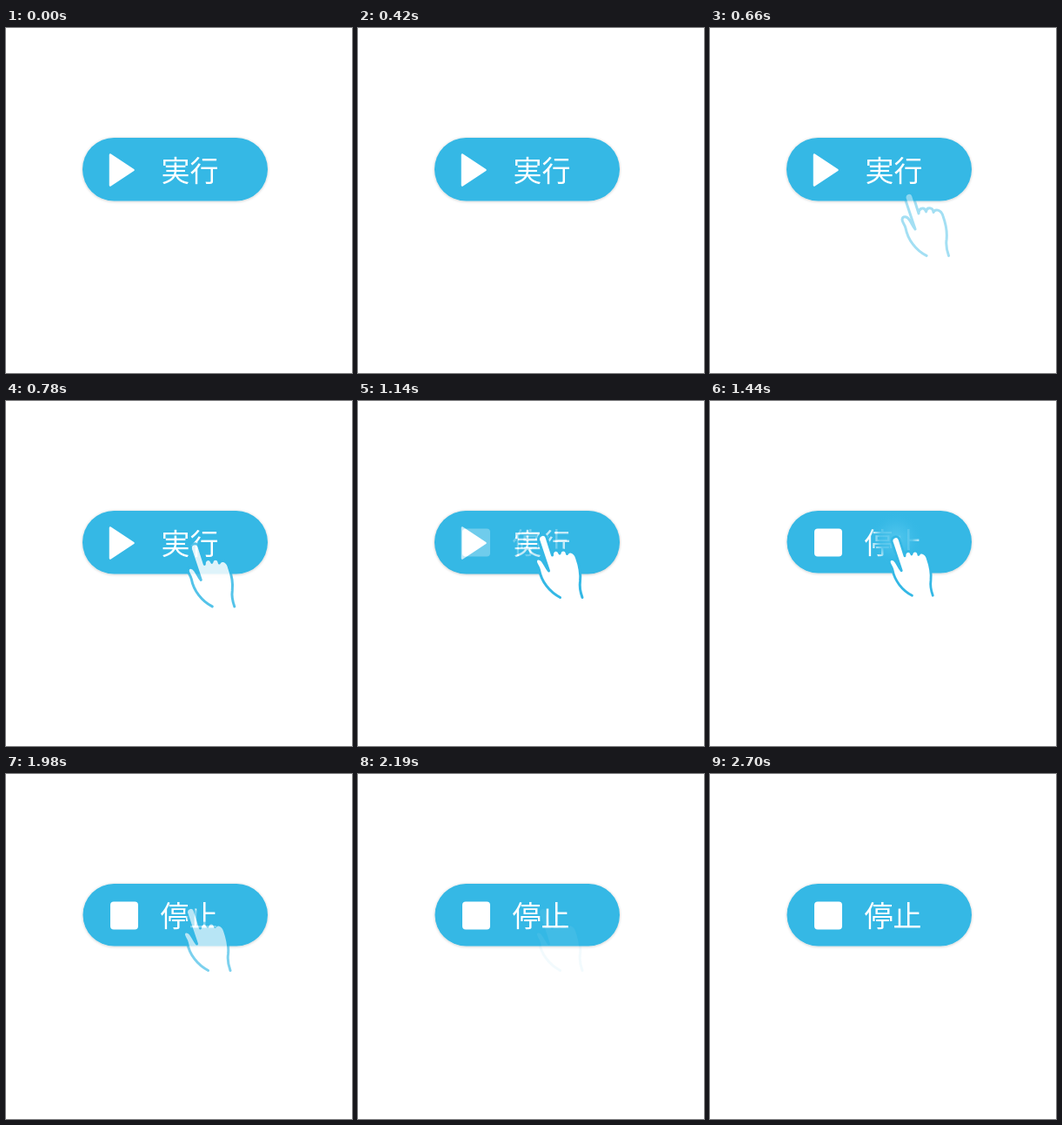
An HTML page that plays this animation: 398x396 px, repeating every 5430 ms.

```html
<!DOCTYPE html>
<html lang="ja">
<head>
<meta charset="utf-8">
<style>
html, body { margin: 0; height: 100%; overflow: hidden; background: #fff; }
svg { display: block; }
text { font: 300 33px "Noto Sans CJK JP", "Noto Sans CJK", "Noto Sans", sans-serif; }
.bar { fill: #34b8e5; }
.white { fill: #fff; }
</style>
</head>
<body>
<svg width="398" height="396" viewBox="0 0 398 396">
  <defs>
    <filter id="shadow" x="-10%" y="-20%" width="120%" height="140%">
      <feDropShadow dx="0" dy="0.5" stdDeviation="1.8" flood-color="#000" flood-opacity=".24"/>
    </filter>
    <radialGradient id="glow">
      <stop offset="0" stop-color="#55c8ee"/>
      <stop offset=".6" stop-color="#3dbce8"/>
      <stop offset="1" stop-color="#34b8e5" stop-opacity="0"/>
    </radialGradient>
  </defs>

  <g id="run">
    <rect class="bar" x="88" y="126" width="213" height="72.5" rx="36.2" filter="url(#shadow)"/>
    <path class="white" d="M120 145.500L146.500 163L120 180.500Z" stroke="#fff" stroke-width="2.500" stroke-linejoin="round"/>
    <text class="white" x="178.500" y="175.500">実行</text>
  </g>

  <g id="stop">
    <rect class="bar" x="88.500" y="126" width="212.500" height="71.500" rx="35.700" filter="url(#shadow)"/>
    <rect class="white" x="120" y="146.500" width="32" height="32" rx="4"/>
    <text class="white" x="177.500" y="174.800">停止</text>
  </g>

  <circle id="ripple" cx="214" cy="158" fill="url(#glow)"/>

  <path id="hand" class="white" stroke="#34b8e5" stroke-width="3" stroke-linecap="round" stroke-linejoin="round"
    d="M232.500 225.500C220 219 211 207 208.500 194C207.500 189 204 187 204.500 183.500
       C205 180 210 180 212.500 184C215.500 188 216 191 219.500 195L207.800 160
       C206 154 214.500 150.500 217 156.500L223.500 177C223 171 230 168.500 232 175
       C232.500 169.500 239.500 169.500 240.500 175.500C242 171.500 249 172 251.500 180
       C254 187 256.500 198 255.500 207C254.500 214 256 220 258 225.500"/>
</svg>
<script>
const LOOP = 5430, STEP = 30;
const [run, stop, ripple, hand] = ['run', 'stop', 'ripple', 'hand'].map(id => document.getElementById(id));

const span = (t, from, to) => Math.min(1, Math.max(0, (t - from) / (to - from)));
const ease = (t, from, to) => {
  const u = span(t, from, to);
  return u * u * (3 - 2 * u);
};

function draw(now) {
  const t = Math.floor(now % LOOP / STEP) * STEP;

  const swap = ease(t, 1020, 1360);
  stop.setAttribute('opacity', swap);
  run.setAttribute('opacity', swap < 1 ? 1 : 0);

  const wave = span(t, 1260, 1570);
  ripple.setAttribute('r', 10 + 36 * wave);
  ripple.setAttribute('opacity', 0.9 * Math.sin(Math.PI * wave));

  // The hand glides in, presses, then fades away.
  const enter = ease(t, 462, 888);
  const away = 1 - enter;
  const scale = 1 - 0.08 * Math.sin(Math.PI * span(t, 1150, 1560));
  hand.setAttribute('opacity', enter * (1 - ease(t, 1790, 2260)));
  hand.setAttribute('transform',
    `translate(${231.5 + 30 * away} ${190.5 + 65 * away}) scale(${scale}) translate(-231.5 -190.5)`);

  requestAnimationFrame(() => draw(performance.now() - start));
}

const start = performance.now();
draw(0);
</script>
</body>
</html>
```
